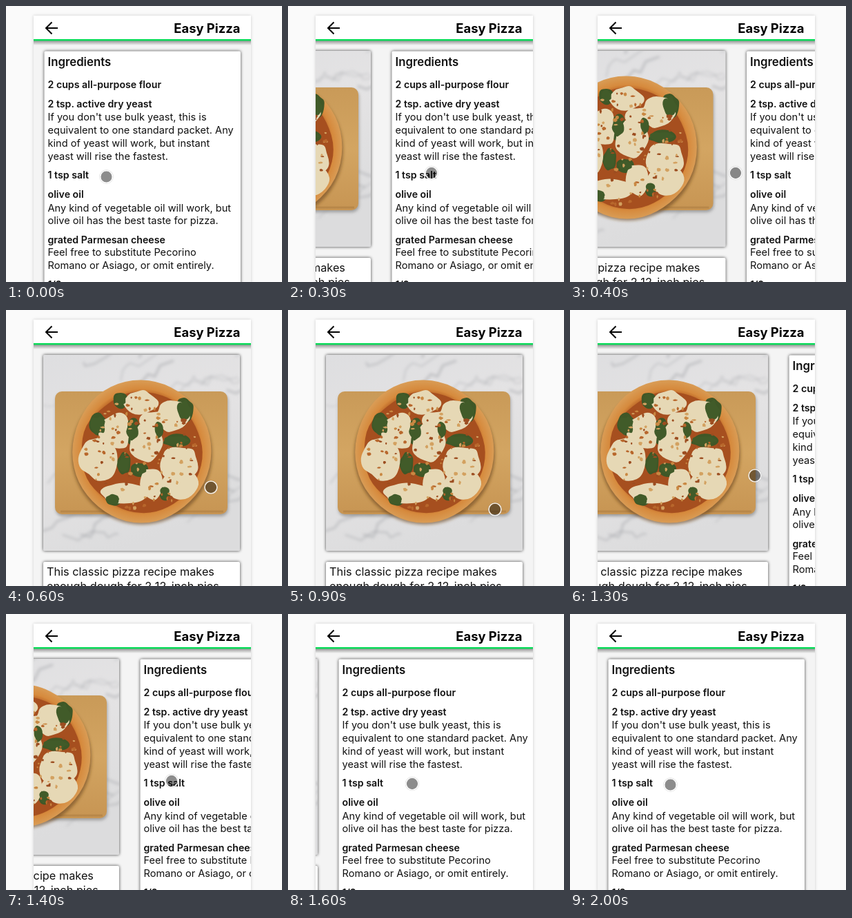
Recreate the animation shown at these times as an HTML page. Size 400 by 400 pixels, loop 2.2 s.

```html
<!DOCTYPE html>
<html lang="en">
<head>
<meta charset="utf-8">
<title>Easy Pizza</title>
<style>
html, body { margin: 0; width: 100%; height: 100%; overflow: hidden; background: #fafafa; }
svg { display: block; width: 100%; height: 100%; }
text { font-family: Inter, sans-serif; font-size: 14.6px; fill: #111; white-space: pre; }
.item { font-size: 14.2px; font-weight: 600; }
.heading { font-size: 16.8px; font-weight: 600; }
.title { font-size: 18.4px; font-weight: 700; text-anchor: end; fill: #000; }
.intro { font-size: 16.3px; }
.card { filter: drop-shadow(0 0 2px rgba(0, 0, 0, .75)); }
</style>
</head>
<body>
<svg viewBox="0 0 400 400">
  <defs>
    <clipPath id="screen"><path d="M40 14H355V400H40Z"/></clipPath>
    <clipPath id="photoClip"><rect x="55" y="65" width="285" height="284" rx="2"/></clipPath>
    <filter id="soft" x="-20%" y="-20%" width="140%" height="140%"><feGaussianBlur stdDeviation="2.2"/></filter>
    <filter id="edge"><feGaussianBlur stdDeviation=".5"/></filter>
    <linearGradient id="marble" x2=".4" y2="1">
      <stop stop-color="#dedee0"/><stop offset=".5" stop-color="#e4e3e4"/><stop offset="1" stop-color="#dcdcdd"/>
    </linearGradient>
    <linearGradient id="wood" x2="0" y2="1">
      <stop stop-color="#c99a58"/><stop offset=".5" stop-color="#d3a562"/><stop offset="1" stop-color="#c79553"/>
    </linearGradient>
    <radialGradient id="crust">
      <stop offset=".8" stop-color="#b75f22"/><stop offset=".88" stop-color="#d68a3d"/><stop offset="1" stop-color="#d99c55"/>
    </radialGradient>
    <linearGradient id="shade" x2="0" y2="1">
      <stop stop-color="#000" stop-opacity=".4"/><stop offset="1" stop-color="#000" stop-opacity="0"/>
    </linearGradient>
  </defs>

  <path d="M40 14H355V402H40Z" fill="#f4f4f4" style="filter:drop-shadow(0 0 2px rgba(0,0,0,.18))"/>
  <g clip-path="url(#screen)">
    <g id="slides">
      <g transform="translate(-315)">
        <rect class="card" x="55" y="65" width="285" height="284" rx="2" fill="#ddd"/>
        <g id="photo" clip-path="url(#photoClip)"></g>
        <rect class="card" x="55" y="365" width="285" height="90" rx="2" fill="#fff"/>
        <text class="intro" x="60" y="385">This classic pizza recipe makes</text>
        <text class="intro" x="60" y="406">enough dough for 2 12-inch pies</text>
      </g>
      <rect class="card" x="55.5" y="65.5" width="284.5" height="380" rx="2" fill="#fff"/>
      <g id="recipe"></g>
    </g>
    <path d="M40 50H355V57H40Z" fill="url(#shade)"/>
    <path d="M40 14H355V48H40Z" fill="#fff"/>
    <path d="M40 48H355V50.5H40Z" fill="#0bdc5a"/>
    <path d="M75 32H58.5M66.5 23.5L58 32L66.5 40.5" fill="none" stroke="#000" stroke-width="2"/>
    <text class="title" x="339.5" y="39">Easy Pizza</text>
  </g>
  <g id="pointer">
    <circle r="9.4" fill="none" stroke="#000" stroke-opacity=".16" stroke-width="1.6"/>
    <circle r="8.2" fill="#000" fill-opacity=".45"/>
    <circle r="9" fill="none" stroke="#fff" stroke-opacity=".85" stroke-width="1.6"/>
  </g>
</svg>
<script>
const byId = id => document.getElementById(id);

const recipe = [
  ["heading", 87, "Ingredients"],
  ["item", 119, "2 cups all-purpose flour"],
  ["item", 147, "2 tsp. active dry yeast"],
  ["", 166, "If you don't use bulk yeast, this is"],
  ["", 185, "equivalent to one standard packet. Any"],
  ["", 204, "kind of yeast will work, but instant"],
  ["", 223, "yeast will rise the fastest."],
  ["item", 250, "1 tsp salt"],
  ["item", 278, "olive oil"],
  ["", 297.5, "Any kind of vegetable oil will work, but"],
  ["", 316, "olive oil has the best taste for pizza."],
  ["item", 343.5, "grated Parmesan cheese"],
  ["", 362, "Feel free to substitute Pecorino"],
  ["", 381, "Romano or Asiago, or omit entirely."],
  ["item", 409, "1/2 cup"],
];
byId("recipe").innerHTML = recipe
  .map(([kind, y, words]) => `<text class="${kind}" x="60.5" y="${y}">${words}</text>`).join("");

let seed = 7;
const random = () => (seed = seed * 16807 % 2147483647) / 2147483647;
const between = (low, high) => low + (high - low) * random();

// Closed smooth outline around an ellipse with a wavering radius
function blob(x, y, rx, ry, fill, rough = .16) {
  const count = 14;
  const points = Array.from({ length: count }, (_, i) => {
    const angle = i / count * 2 * Math.PI, size = between(1 - rough, 1 + rough);
    return [x + rx * size * Math.cos(angle), y + ry * size * Math.sin(angle)];
  });
  const middle = i => {
    const a = points[i % count], b = points[(i + 1) % count];
    return `${((a[0] + b[0]) / 2).toFixed(1)} ${((a[1] + b[1]) / 2).toFixed(1)}`;
  };
  const curves = points.map((p, i) => `Q${p[0].toFixed(1)} ${p[1].toFixed(1)} ${middle(i)}`);
  return `<path d="M${middle(count - 1)}${curves.join("")}Z" fill="${fill}"/>`;
}

function vein() {
  let x = between(45, 345), y = between(60, 340), path = `M${x} ${y}`;
  for (let i = 0; i < 7; i++) {
    x += between(2, 20);
    y -= between(-8, 16);
    path += `L${x.toFixed(1)} ${y.toFixed(1)}`;
  }
  return `<path d="${path}" fill="none" stroke="#a9abb0" stroke-opacity=".55" stroke-width="${between(1, 4).toFixed(1)}"/>`;
}

function spot() {
  const angle = between(0, 2 * Math.PI), distance = 84 * Math.sqrt(random());
  const color = ["#b8672c", "#c98842", "#9c4d20", "#d3a160"][Math.floor(random() * 4)];
  return blob(198 + distance * Math.cos(angle), 206 + distance * Math.sin(angle),
    between(1, 3.5), between(1, 3), color, .25);
}

const repeat = (count, make) => Array.from({ length: count }, make).join("");
const cheese = [
  [195, 133, 25, 17], [242, 155, 26, 22], [160, 175, 24, 27], [137, 215, 28, 32],
  [203, 192, 25, 27], [252, 222, 31, 25], [172, 264, 34, 16], [213, 252, 17, 24],
  [254, 253, 26, 20], [215, 160, 20, 14],
];
const spinach = [
  [135, 167, 13, 17], [167, 131, 11, 12], [184, 176, 11, 20], [259, 146, 14, 20],
  [222, 172, 8, 17], [248, 189, 20, 9], [172, 222, 10, 16], [194, 231, 13, 10],
  [157, 274, 13, 9], [231, 266, 9, 11],
];
byId("photo").innerHTML = `
  <path d="M55 65H340V349H55Z" fill="url(#marble)"/>
  <g filter="url(#soft)">${repeat(26, vein)}
    <rect x="73" y="121" width="250" height="178" rx="10" fill="#777" opacity=".6"/></g>
  <rect x="72" y="118" width="250" height="178" rx="10" fill="url(#wood)"/>
  <path d="M80 292H316" stroke="#a97a40" stroke-width="3" opacity=".5"/>
  <g filter="url(#soft)"><circle cx="198" cy="209" r="102" fill="#6b431c" opacity=".6"/></g>
  <g filter="url(#edge)">
    ${blob(197, 205, 103, 105, "url(#crust)", .018)}
    ${blob(197, 206, 89, 88, "#a64f1f", .04)}
    ${spinach.map(s => blob(...s, "#3f5727")).join("")}
    ${cheese.map(c => blob(...c, "#e6d8b5")).join("")}
    ${spinach.map(([x, y, rx, ry]) => blob(x, y, rx * .8, ry * .75, "#415b29", .25)).join("")}
    ${repeat(120, spot)}
  </g>`;

// Swipe right, hold, swipe left: [ms, slide offset, pointer x, pointer y]
const keys = [
  [0, 0, 145.5, 247.5], [100, 5, 151, 247], [200, 32, 176, 244], [300, 95, 208, 242],
  [400, 200.5, 240, 242], [500, 286, 274, 248], [600, 314, 297, 257], [700, 315, 300, 270],
  [900, 315, 300, 289], [1100, 315, 296, 262], [1200, 311, 290, 243], [1300, 262, 268, 240],
  [1400, 139, 240, 242], [1500, 55, 210, 244], [1600, 18, 180, 246], [1700, 4, 157, 247],
  [1800, 0, 145.5, 247.5], [2200, 0, 145.5, 247.5],
];

function pose(time) {
  const next = keys.findIndex(key => key[0] > time);
  const from = keys[next - 1], to = keys[next];
  const part = (time - from[0]) / (to[0] - from[0]);
  return from.map((value, i) => value + (to[i] - value) * part);
}

function draw() {
  const time = Math.floor(performance.now() % 2200 / 100) * 100;
  const [, offset, x, y] = pose(time);
  byId("slides").setAttribute("transform", `translate(${offset})`);
  byId("pointer").setAttribute("transform", `translate(${x} ${y})`);
  requestAnimationFrame(draw);
}
draw();
</script>
</body>
</html>
```
